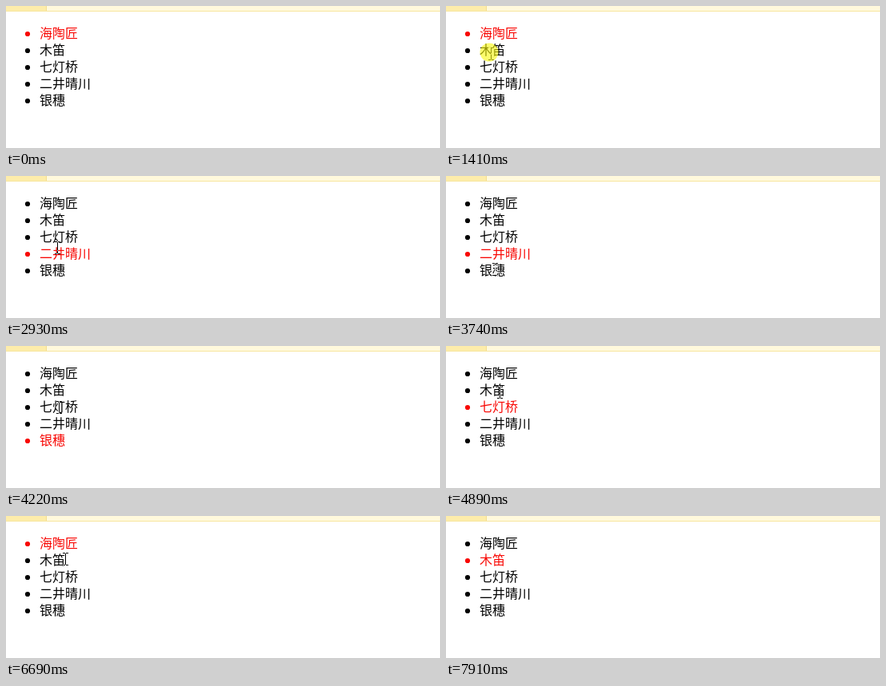
Animation, 543 px wide and 178 px high, one loop 8310 ms. Source, as an HTML page with a canvas:

```html
<!DOCTYPE html>
<html lang="zh-CN">
<head>
<meta charset="utf-8">
<style>
html, body { margin: 0; width: 100%; height: 100%; overflow: hidden; background: #fff; }
canvas { display: block; }
</style>
</head>
<body>
<canvas id="stage" width="543" height="178"></canvas>
<script>
const ctx = document.getElementById('stage').getContext('2d');
const LOOP = 8310;
const SAMPLE = 66.5; // pointer sampling interval, ms
const HOLD = 130;    // how long the button stays down, ms
const ROW = 21;
const TOP = 24;

const items = ['海陶匠', '木笛', '七灯桥', '二井晴川', '银穗'];

// The pointer leaves for each stop at "depart" and may press there.
const entry = { x: 254, y: 190 };
const stops = [
  { depart: 325, x: 34, y: 61 },
  { depart: 820, x: 56, y: 60, press: 1340 },
  { depart: 1680, x: 65, y: 75, press: 2130 },
  { depart: 2300, x: 64, y: 90, press: 2670 },
  { depart: 3250, x: 61, y: 117, press: 3810 },
  { depart: 3990, x: 66, y: 77, press: 4490 },
  { depart: 4690, x: 67, y: 58, press: 5350 },
  { depart: 5750, x: 80, y: 36, press: 6160 },
  { depart: 6485, x: 74, y: 54, press: 6830 },
  { depart: 7430, x: 390, y: 190 }
];
const clicks = stops.filter(stop => stop.press);

function glide(from, to, t) {
  const duration = 150 + 0.6 * Math.hypot(to.x - from.x, to.y - from.y);
  const u = Math.min(1, Math.max(0, (t - to.depart) / duration));
  const k = u * u * (3 - 2 * u);
  return { x: from.x + (to.x - from.x) * k, y: from.y + (to.y - from.y) * k };
}

function pointerAt(t) {
  const sampled = Math.floor((t + 3) / SAMPLE) * SAMPLE;
  const { x, y } = stops.reduce((from, to) => glide(from, to, sampled), entry);
  return [Math.round(x), Math.round(y)];
}

function selectedAt(t) {
  const last = clicks.filter(c => t >= c.press + HOLD).pop();
  return last ? Math.floor((last.y - TOP) / ROW) : 0;
}

function rect(color, x, y, w, h) {
  ctx.fillStyle = color;
  ctx.fillRect(x, y, w, h);
}

function disc(color, x, y, r) {
  ctx.fillStyle = color;
  ctx.beginPath();
  ctx.arc(x, y, r, 0, 2 * Math.PI);
  ctx.fill();
}

function drawHeader() {
  rect('#fff9dc', 0, 0, 543, 6);
  rect('#fdecaa', 0, 0, 50, 6);
  rect('#f3dd90', 50, 0, 1, 6);
  rect('#f8e6a0', 0, 6, 543, 1);
}

function drawList(selected) {
  ctx.font = '16px "Noto Sans CJK SC", "Noto Sans CJK", sans-serif';
  items.forEach((label, i) => {
    const y = TOP + ROW * i;
    disc(i === selected ? '#f80804' : '#000', 27, y + 11, 3.1);
    ctx.fillText(label, 42, y + 16);
  });
}

function drawBeam(x, y) {
  ctx.globalCompositeOperation = 'difference';
  rect('#fff', x, y - 7, 1, 14);
  for (const edge of [y - 8, y + 7]) {
    rect('#fff', x - 3, edge, 3, 1);
    rect('#fff', x + 1, edge, 3, 1);
  }
  ctx.globalCompositeOperation = 'source-over';
}

function drawArrow(x, y) {
  const outline = [[0, 0], [0, 16], [4, 12.5], [7, 18.5], [9, 17.5], [6.5, 11.5], [11, 11.5]];
  ctx.beginPath();
  outline.forEach(([dx, dy]) => ctx.lineTo(x + dx + 0.5, y + dy + 0.5));
  ctx.closePath();
  ctx.fillStyle = '#fff';
  ctx.fill();
  ctx.strokeStyle = '#000';
  ctx.lineWidth = 1;
  ctx.stroke();
}

function drawPointer(t) {
  const [x, y] = pointerAt(t);
  const overText = x >= 42 && x <= 90;
  (overText ? drawBeam : drawArrow)(x, y);
  if (clicks.some(c => t >= c.press && t < c.press + HOLD)) {
    disc('rgba(248, 248, 10, 0.6)', x - 2, y - 2, 11.5);
  }
}

function draw(t) {
  rect('#fff', 0, 0, 543, 178);
  drawHeader();
  drawList(selectedAt(t));
  drawPointer(t);
}

const start = performance.now();
function tick() {
  draw((performance.now() - start) % LOOP);
  requestAnimationFrame(tick);
}
tick();
</script>
</body>
</html>
```
